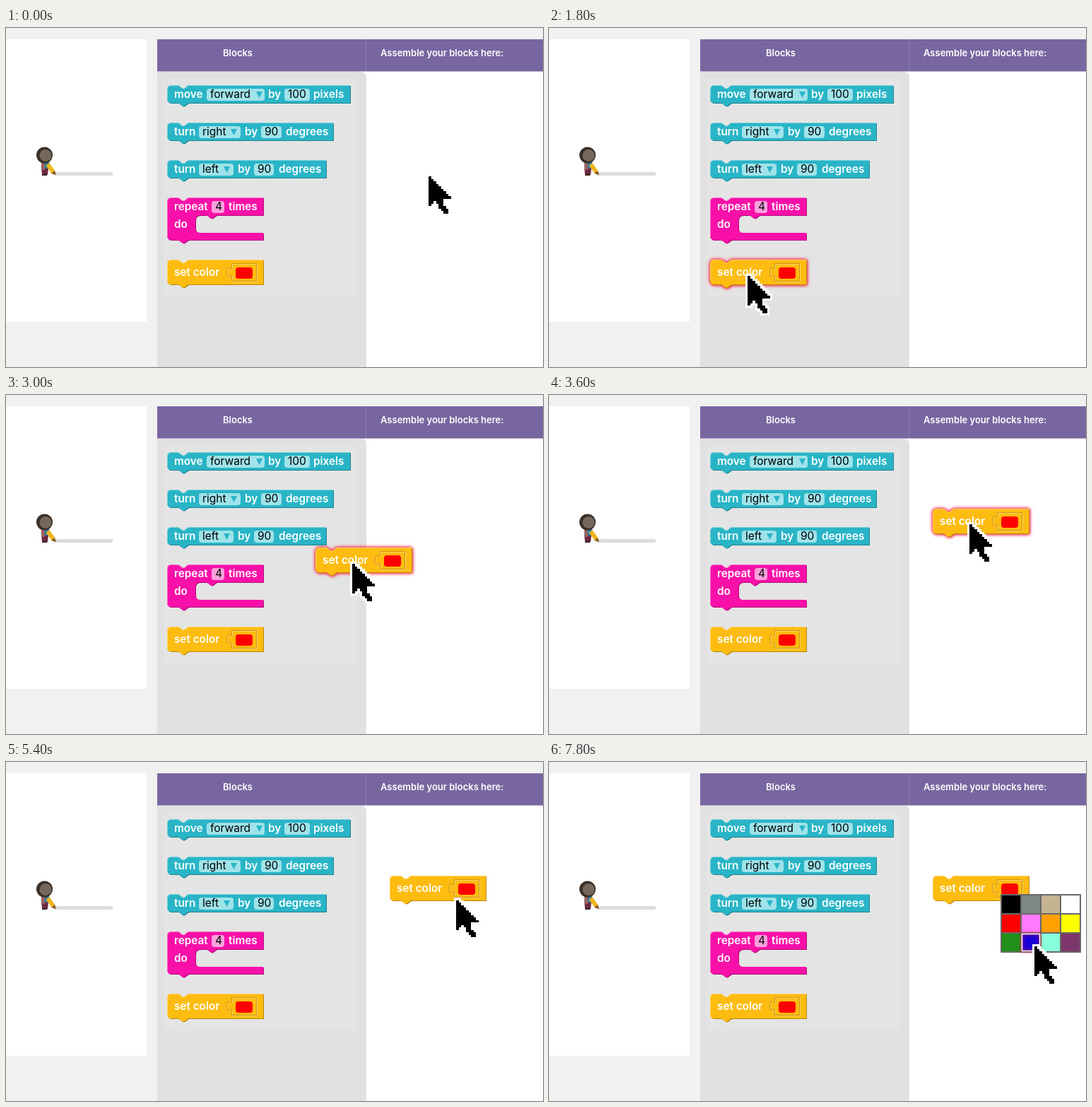
Recreate the animation shown at these times as an HTML page. Size 760x480 px, loop 8000 ms.

```html
<!DOCTYPE html>
<html lang="en">
<head>
<meta charset="utf-8">
<title>Block assembly</title>
<style>
html, body { margin: 0; width: 100%; height: 100%; overflow: hidden; }
svg { display: block; width: 760px; height: 480px; background: #f1f1f1; }
text { font: 600 15.3px Inter, "Open Sans", sans-serif; fill: #fff; }
text.head { font-size: 13px; }
text.field { font-weight: 400; font-size: 15.5px; fill: #000; }
</style>
</head>
<body>
<svg id="stage" viewBox="0 0 760 480"></svg>
<script>
const STEP = 300, LOOP = 8000;
const TEAL = '#29b5c7', PINK = '#f810a8', AMBER = '#ffbc10';
const stage = document.getElementById('stage');

const rect = (x, y, w, h, fill, extra = '') =>
  `<rect x="${x}" y="${y}" width="${w}" height="${h}" fill="${fill}" ${extra}/>`;
const text = (x, y, s, cls = '') => `<text x="${x}" y="${y}" class="${cls}">${s}</text>`;
const field = (x, w, s, fill = '#9fe3ea') =>
  rect(x, 5, w, 17, fill, 'rx="4"') + text(x + 5, 18, s, 'field');
const arrow = x => `<path d="M${x} 9h9l-4.5 9z" fill="${TEAL}"/>`;

// Block outlines: a notch on the top edge, a tab on the bottom edge
const notch = 'c3 0 5 4.5 8 4.5s5-4.5 8-4.5';
const tab = 'c-3 0-5 4.5-8 4.5s-5-4.5-8-4.5';
const top0 = `M0 6q0-6 6-6h9${notch}`;
const foot = `H31${tab}H6q-6 0-6-6z`;
const plain = (w, h) => `${top0}H${w}V${h}${foot}`;
const loopShape =
  `${top0}H136V25H71${tab}H47q-7 0-7 7v11q0 7 7 7H136V60${foot}`;

function block(y, w, h, fill, inner, d = plain(w, h)) {
  return `<g transform="translate(228 ${y})">
    <path d="${d}" transform="translate(1 1)" fill="${fill}" style="filter:brightness(.72)"/>
    <path d="${d}" fill="${fill}"/>
    <path d="M.5 ${h - 5}V6q0-5.500 5.500-5.500h9${notch}H${w}" fill="none" stroke="#fff" stroke-opacity=".35"/>
    ${inner}</g>`;
}

const socket = 'M91.5 5.500h35v25h-35v-5.500c0-10-7 8-7-7.500s7 2.500 7-7.500z';
const colorBlock = block(328, 136, 35, AMBER,
  text(10, 23, 'set color') +
  `<path d="${socket}" transform="translate(1 1)" fill="none" stroke="#ffd76c"/>
   <path d="${socket}" fill="none" stroke="#c8920c"/>` +
  rect(97, 11, 24, 16, '#f00', 'rx="4"'));

const artist = `
  <path d="M69 206.500H149" stroke="#dcdcdc" stroke-width="5" stroke-linecap="round"/>
  <path d="M50 198h10l-1 10h-8z" fill="#6b2942"/>
  <path d="M50 188h11l1 11H50z" fill="#347e9b"/>
  <path d="M52 191l1 10" stroke="#a7605a" stroke-width="4"/>
  <circle cx="54.500" cy="180" r="11.500" fill="#3b3028"/>
  <circle cx="56" cy="180.500" r="8.500" fill="#75675a"/>
  <path d="M59 193l8 11" stroke="#eeb51f" stroke-width="6"/>
  <path d="M64 206l5-4 2 6z" fill="#8a5a1c"/>
  <path d="M51 208h7" stroke="#3b2420" stroke-width="2"/>`;

const backdrop =
  rect(0, 16, 199, 400, '#fff') + artist +
  rect(214, 61, 546, 419, '#fff') +
  '<path d="M214 62H502q8 0 8 8V480H214z" fill="#e1e1e1"/>' +
  rect(214, 16, 546, 45.5, '#7866a0') + rect(509, 16, 1, 45, '#8d7f9f') +
  rect(223, 72, 274, 308, '#e4e4e4') +
  text(307, 40, 'Blocks', 'head') + text(530, 40, 'Assemble your blocks here:', 'head') +
  block(81, 259, 25, TEAL, text(10, 18, 'move') + field(56, 82, 'forward') + arrow(126) +
    text(143, 18, 'by') + field(166, 36, '100') + text(207, 18, 'pixels')) +
  block(134, 235, 25, TEAL, text(10, 18, 'turn') + field(45, 59, 'right') + arrow(90) +
    text(110, 18, 'by') + field(133, 29, '90') + text(168, 18, 'degrees')) +
  block(187, 225, 25, TEAL, text(10, 18, 'turn') + field(45, 49, 'left') + arrow(80) +
    text(100, 18, 'by') + field(123, 28, '90') + text(158, 18, 'degrees')) +
  block(240, 136, 60, PINK, text(10, 18, 'repeat') + field(63, 18, '4', '#fba0dc') +
    text(87, 18, 'times') + text(10, 43, 'do'), loopShape) +
  colorBlock;

const swatches = ['#000', '#7f8887', '#c5b491', '#fff', '#f00', '#ff7aff',
  '#ffa000', '#ff0', '#228f1b', '#1800d8', '#88ffdb', '#7d366b'];
const CELL_W = 28, CELL_H = 27, LEFT = 640, TOP = 188;
const cellX = i => LEFT + i % 4 * CELL_W;
const cellY = i => TOP + Math.floor(i / 4) * CELL_H;
const cells = swatches.map((c, i) =>
  rect(cellX(i), cellY(i), CELL_W, CELL_H, c, 'stroke="#686868" stroke-width="2"')).join('');

// Pixel arrow: nine growing rows, then the tail
const PX = 3.5;
const rows = [...Array.from({ length: 9 }, (_, i) => '#'.repeat(i + 1)),
  '######', '##.###', '#...##', '....###', '.....###', '......##'];
const pixels = rows.map((row, y) => [...row].map((c, x) =>
  c === '#' ? `M${x * PX} ${y * PX}h${PX}v${PX}h${-PX}z` : '').join('')).join('');

stage.innerHTML = backdrop +
  `<g id="drag">${colorBlock}</g>
   <g id="picker"><g id="cells">${cells}</g>
     ${rect(0, 0, 25, 24, 'none', 'id="hot" stroke="#fff" stroke-width="1.5"')}</g>
   <g id="cursor" shape-rendering="crispEdges">
     <path d="${pixels}" fill="#fff" stroke="#fff" stroke-width="6.6"/>
     <path d="${pixels}"/></g>`;

const [drag, picker, cellGroup, hot, cursor] =
  ['drag', 'picker', 'cells', 'hot', 'cursor'].map(id => document.getElementById(id));

// Cursor path: step, x, y
const path = [[0, 598, 210], [6, 281, 351], [12, 595, 183], [14, 598, 218],
  [15, 599, 230], [19, 650, 184], [22, 656, 208], [26, 687, 261]];
function cursorAt(n) {
  const k = Math.max(1, path.findIndex(p => p[0] >= n));
  const [n0, x0, y0] = path[k - 1], [n1, x1, y1] = path[k];
  const u = (n - n0) / (n1 - n0);
  return [x0 + (x1 - x0) * u, y0 + (y1 - y0) * u];
}
const clamp = v => Math.min(1, Math.max(0, v));
const move = (el, x, y) => el.setAttribute('transform', `translate(${x} ${y})`);
const show = (el, on) => el.style.display = on ? '' : 'none';
function glow(el, a) {
  const shadow = `drop-shadow(0 0 2px rgba(255,0,40,${a}))`;
  el.style.filter = a > 0 ? `${shadow} ${shadow}` : 'none';
}

function render(n) {
  const [x, y] = cursorAt(n);
  move(cursor, x, y);

  const u = clamp((n - 6) / 6);
  show(drag, n >= 6);
  move(drag, Math.round(314.5 * u), Math.round(-167.5 * u));
  glow(drag, .75 * clamp((15 - n) / 3));

  show(picker, n >= 20);
  glow(cellGroup, .6 * clamp((24 - n) / 4));
  const col = Math.floor((x - LEFT) / CELL_W), row = Math.floor((y - TOP) / CELL_H);
  const i = Math.max(0, row) * 4 + Math.max(0, col);
  hot.setAttribute('x', cellX(i) + 1.5);
  hot.setAttribute('y', cellY(i) + 1.5);
  glow(hot, n >= 23 ? .5 : 0);
}

function tick() {
  render(Math.floor(performance.now() % LOOP / STEP));
  requestAnimationFrame(tick);
}
tick();
</script>
</body>
</html>
```
